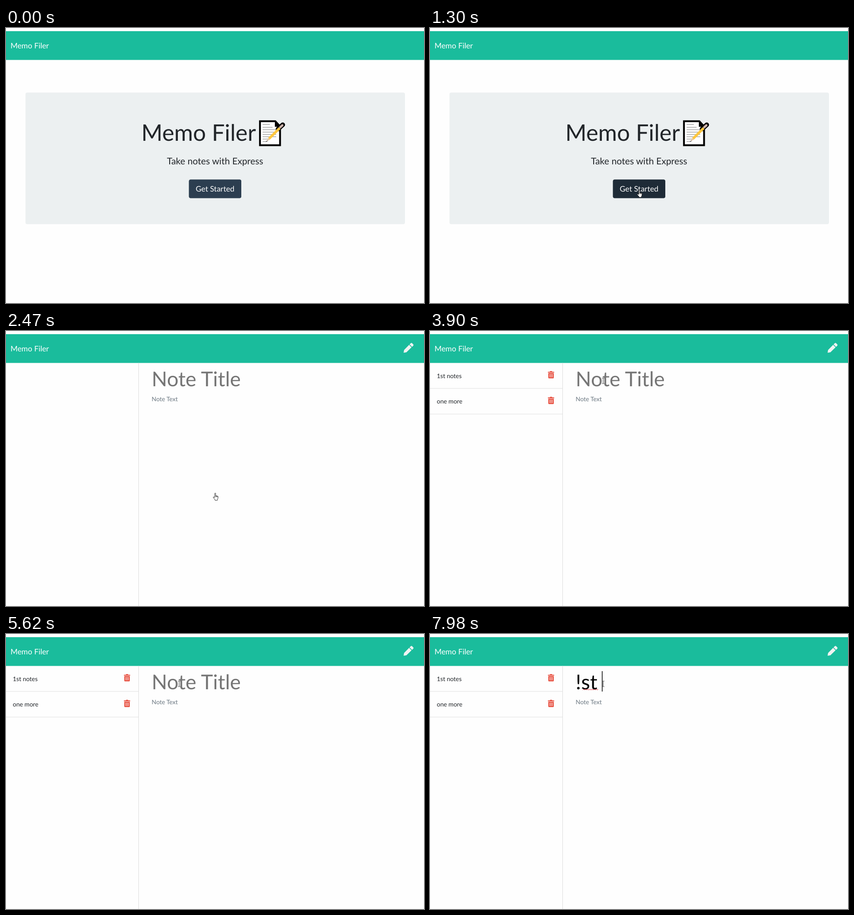
An HTML page that plays this animation: 922 by 607 pixels, repeating every 8000 ms.

```html
<!DOCTYPE html>
<html lang="en">
<head>
<meta charset="utf-8">
<title>Memo Filer</title>
<style>
  html, body { margin: 0; width: 100%; height: 100%; overflow: hidden; background: #fefefe; }
  svg { display: block; font-family: Lato, sans-serif; text-rendering: geometricPrecision; }
  text { white-space: pre; }
</style>
</head>
<body>
<svg width="922" height="607" viewBox="0 0 922 607" fill="#212529">
  <defs>
    <g id="trash" fill="#e74c3c">
      <path d="M0 2.2q0-.8.8-.8H4l.8-1Q5 0 5.6 0h2.8q.6 0 .8.4l.8 1h3.2q.8 0 .8.8v1H0z"/>
      <path fill-rule="evenodd" d="M1 4.2h12v10.3q0 1.5-1.5 1.5h-9Q1 16 1 14.5zM3.6 6.2v7.6h1.1V6.2zM6.5 6.2v7.6h1.1V6.2zM9.4 6.2v7.6h1.1V6.2z"/>
    </g>
  </defs>

  <rect y="7" width="922" height="63.5" fill="#1abc9c"/>
  <text x="10" y="44.5" font-size="16.9" fill="#fff">Memo Filer</text>

  <g id="home">
    <rect x="43" y="142.5" width="837" height="290.5" rx="4" fill="#ecf0f1"/>
    <text x="298.4" y="249.3" font-size="50.4">Memo Filer</text>
    <g stroke="#000" stroke-width="4" fill="#fff">
      <path d="M560.2 205.8H594L604.5 217V258.8H560.2Z"/>
      <path d="M594 206v11h10" fill="#000" stroke-width="2"/>
      <path d="M566 213h16m-16 6.2h22m-22 5.3h30m-30 5.2h30m-30 5.2h30m-30 5.2h30m-30 5.2h16m-16 5.2h9" stroke="#a3a3a3" stroke-width="1.5"/>
      <path d="M600 223L610.5 213.5" stroke-width="10" stroke-linecap="round"/>
      <path d="M605 219L609.5 214.8" stroke="#cdb5ad" stroke-width="5" stroke-linecap="round"/>
      <path d="M580.5 244L603.5 221" stroke="#fdc63f" stroke-width="5.5"/>
      <path d="M578.4 242l4.2 4.2-7.6 3.4z" fill="#e8c9a0" stroke="none"/>
      <path d="M577 249l-3.5 1.8" stroke="#444" stroke-width="1.3"/>
    </g>
    <text x="461.2" y="301" font-size="20.25" text-anchor="middle">Take notes with Express</text>
    <rect id="ring" fill="#4c5b6a" fill-opacity=".6"/>
    <rect id="button" x="403.5" y="334.5" width="115.5" height="41" rx="4"/>
    <text x="461.2" y="361" font-size="16.9" text-anchor="middle" fill="#fff">Get Started</text>
  </g>

  <g id="notes">
    <path d="M292.5 70.5V607" stroke="#dcdddd"/>
    <path fill="#f0f3f2" d="M877 48l1-6L889.2 30.6l5.3 5.3L883.2 47zM890.2 29.6l2.6-2.6q1.5-1.4 3 0l2.5 2.5q1.4 1.5 0 3l-2.6 2.6z"/>
    <g id="list" font-size="13.5">
      <path d="M0 126.8H292M0 183.3H292" stroke="#dfdfdf"/>
      <text x="15" y="103.5">1st notes</text>
      <text x="15" y="160.3">one more</text>
      <use href="#trash" x="260" y="88.5"/>
      <use href="#trash" x="260" y="145.2"/>
    </g>
    <text id="title" x="321.3" y="121.5" font-size="45"></text>
    <path id="squiggle" fill="none" stroke="#e2323c"/>
    <text x="321.3" y="155" font-size="13.5" fill="#6a7680">Note Text</text>
    <rect id="caret" y="82" width="1.5" height="45" fill="#000"/>
  </g>

  <g id="pointer" fill="#fff" stroke="#000" stroke-width=".8" stroke-linejoin="round">
    <path id="arrow" d="M.4.5V15.5l3.4-3.2 2.3 5.4 2.4-1-2.3-5.2h4.6z"/>
    <path id="hand" d="M-.6 9V.8a1.1 1.1 0 012.2 0V5.5l4.3 1q1.2.4 1 1.8l-.8 4.2-.9 1.6v1.6H0v-1.5L-3.6 10q-1-1.6.6-1.9L-.6 9.6zM1.6 5.5v2.8M3.4 6v2.5M5.1 6.4v2.4"/>
    <path id="beam" fill="none" stroke="#333" stroke-width="1" d="M-2.5-6H-.7L0-5.4.7-6H2.5M0-5.4V5.4M-2.5 6H-.7L0 5.4.7 6H2.5"/>
  </g>
</svg>
<script>
const LOOP = 8000;
const $ = id => document.getElementById(id);
const set = (id, attrs) => { for (const k in attrs) $(id).setAttribute(k, attrs[k]); };
const show = (id, on) => set(id, { visibility: on ? 'inherit' : 'hidden' });
const clamp = v => Math.max(0, Math.min(1, v));
const mix = (a, b, p) => a + (b - a) * p;
const easeOut = p => 1 - (1 - p) ** 2;

// start, end, number of held positions, from, to
const moves = [
  [220, 350, 3, [843, 514], [648, 466]],
  [600, 1300, 12, [648, 466], [461, 358]],
  [3020, 3200, 4, [462, 365], [343, 160]],
  [3450, 3680, 4, [343, 160], [394, 122]],
  [3680, 3900, 4, [394, 122], [382, 110]]
];

// time, typed text, caret position
const typing = [
  [0, '', 321.3], [7170, '!', 335.8], [7550, '!s', 354.6],
  [7800, '!st', 370.6], [7890, '!st ', 379]
];
const blinks = [4010, 4560, 5060, 5620, 6120, 6670, 7170];

function pointerAt(t) {
  const [start, end, steps, from, to] = moves.filter(m => t >= m[0]).pop() || moves[0];
  const held = Math.floor((t - start) / (end - start) * (steps - 1) + 1e-6) + 1;
  const p = easeOut(clamp(held / steps));
  return from.map((v, i) => mix(v, to[i], p));
}

// Moment at which the pointer first touches the button
let hoverStart = 600;
while (pointerAt(hoverStart)[1] > 376) hoverStart += 5;

function draw(t) {
  const home = t < 2470;
  show('home', home);
  show('notes', !home);
  show('list', t >= 2520);

  const hover = clamp((t - hoverStart) / 150);
  set('button', { fill: `rgb(${mix(44, 30, hover)},${mix(62, 43, hover)},${mix(80, 55, hover)})` });
  const r = 3 * clamp((t - 2100) / 200);
  set('ring', { x: 403.5 - r, y: 334.5 - r, width: 115.5 + 2 * r, height: 41 + 2 * r, rx: 4 + r });

  const [, typed, caretX] = typing.filter(k => t >= k[0]).pop();
  $('title').textContent = typed || 'Note Title';
  set('title', { fill: typed ? '#000' : '#757575' });
  set('caret', { x: caretX });
  show('caret', !home && blinks.filter(b => t >= b).length % 2);
  show('squiggle', t >= 7980);

  const [x, y] = pointerAt(t);
  set('pointer', { transform: `translate(${x} ${y})` });
  show('pointer', t >= 220);
  show('arrow', t < hoverStart);
  show('hand', t >= hoverStart && t < 3020);
  show('beam', t >= 3020);
  if (t < 220) show('arrow', false);
}

set('squiggle', { d: 'M337 123.5' + 'l2-1.6 2 1.6'.repeat(8) + 'l2-1.6' });

(function frame() {
  draw(performance.now() % LOOP);
  requestAnimationFrame(frame);
})();
</script>
</body>
</html>
```
